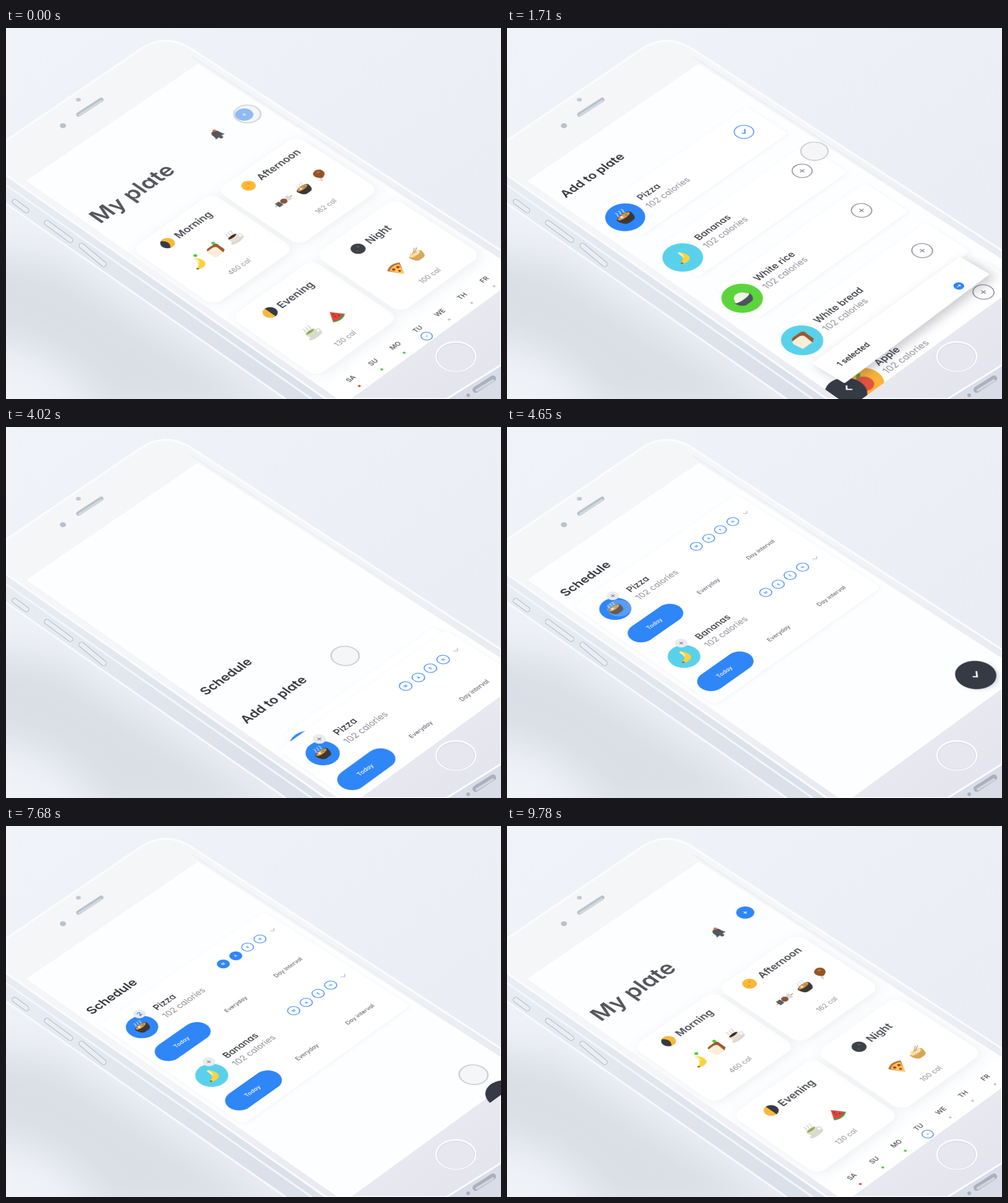
An HTML page that plays this animation: 800 by 600 pixels, repeating every 9810 ms.

```html
<!DOCTYPE html>
<html lang="en">
<head>
<meta charset="utf-8">
<title>Meal planner</title>
<style>
  html, body { margin: 0; width: 100%; height: 100%; overflow: hidden; background: #eef1f6; }
  #stage { position: relative; width: 800px; height: 600px; overflow: hidden; }
  svg { position: absolute; left: 0; top: 0; }
  .plane { transform-origin: 0 0; }
  #screen { overflow: hidden; }
  #overlay { overflow: visible; }
  text { font-family: Inter, "Open Sans", sans-serif; font-feature-settings: "cv11"; }
  .mid { text-anchor: middle; dominant-baseline: central; }
  .card { fill: #fff; filter: drop-shadow(1px 4px 10px rgba(40, 40, 70, .075)); }
  .flat { fill: #fff; filter: drop-shadow(0 2px 4px rgba(60, 70, 120, .06)); }
  .popup { fill: #fff; stroke: #fff; stroke-width: 5; stroke-linejoin: round;
           filter: drop-shadow(2px 8px 9px rgba(30, 30, 60, .25)); }
  .line { fill: none; stroke-linecap: round; stroke-linejoin: round; }
</style>
</head>
<body>
<div id="stage">
  <svg width="800" height="600">
    <defs>
      <linearGradient id="bg" x2="1" y2="1">
        <stop stop-color="#f0f3f8"/><stop offset=".5" stop-color="#eceff5"/><stop offset="1" stop-color="#e8ebf1"/>
      </linearGradient>
      <linearGradient id="face" x2="1" y2="1">
        <stop stop-color="#f5f6f8"/><stop offset=".45" stop-color="#f6f6f9"/><stop offset="1" stop-color="#e2e3ed"/>
      </linearGradient>
      <linearGradient id="side" x2=".6" y2="1">
        <stop stop-color="#e9edf3"/><stop offset="1" stop-color="#dbe1ea"/>
      </linearGradient>
      <filter id="blur" x="-50%" y="-50%" width="200%" height="200%"><feGaussianBlur stdDeviation="28"/></filter>
    </defs>
    <rect width="800" height="600" fill="url(#bg)"/>
    <g filter="url(#blur)">
      <path d="M-60 360L80 380L440 620H160Q110 520-60 490Z" fill="#d9dfe5"/>
      <path d="M-60 560L60 540L130 640H-60Z" fill="#f1f4f8" opacity=".7"/>
    </g>
    <path d="M0 236V284L452 600H524Z" fill="url(#side)"/>
    <path d="M0 284L452 600" stroke="#f7f9fc" stroke-width="3"/>
    <path d="M0 254L494 600" stroke="#f4f6fa" stroke-width="3"/>
    <path d="M712 600L800 545V600Z" fill="#d9dde8"/>
    <path d="M0 182L222 31Q262 8 303 36L800 360V545L712 600H517L0 238Z" fill="url(#face)" stroke="#fbfcfd" stroke-width="3"/>
    <path d="M300 46L800 370" stroke="#eceef4" stroke-width="2"/>
    <g class="line" stroke="#aeb7c6" stroke-width="9"><path d="M14 281L33 295M66 315L104 343M122 352L158 382"/></g>
    <g class="line" stroke="#eaeef4" stroke-width="7"><path d="M14 281L33 295M66 315L104 343M122 352L158 382"/></g>
    <path d="M117 140L154 116" stroke="#b9c3cb" stroke-width="7" stroke-linecap="round"/>
    <path d="M118 141L154 118" stroke="#d2dade" stroke-width="3" stroke-linecap="round"/>
    <ellipse cx="92" cy="158" rx="5" ry="4" fill="#b9c1cb"/>
    <ellipse cx="117" cy="116" rx="4" ry="3" fill="#c3cad2"/>
    <ellipse cx="727" cy="531" rx="32" ry="23.5" fill="#e6e7ef" stroke="#fff" stroke-width="2"/>
    <ellipse cx="727" cy="532" rx="30" ry="22" fill="none" stroke="#d9dbe5"/>
    <path d="M759 585L787 567" stroke="#aab0bd" stroke-width="10" stroke-linecap="round"/>
    <path d="M761 586L787 570" stroke="#d1d5de" stroke-width="4" stroke-linecap="round"/>
    <ellipse cx="747" cy="594" rx="3" ry="3" fill="#a9afbc"/>
  </svg>
  <svg id="screen" class="plane" width="375" height="677"></svg>
  <svg id="overlay" class="plane" width="375" height="667"></svg>
</div>
<script>
const LOOP = 9810, W = 375, H = 667, AWAY = 660;
const BLUE = '#2f86f7', DARK = '#343b45', INK = '#33353d', SOFT = '#8b8d99';
const OUT = 'cubic-bezier(.215,.61,.355,1)', IN = 'cubic-bezier(.55,.06,.68,.19)', BOTH = 'cubic-bezier(.45,0,.55,1)';

// Perspective that lays the flat 375x667 interface onto the phone.
const plane = (([x0, y0], [x1, y1], [x2, y2], [x3, y3]) => {
  const ax = x1 - x2, ay = y1 - y2, bx = x3 - x2, by = y3 - y2;
  const sx = x0 - x1 + x2 - x3, sy = y0 - y1 + y2 - y3, det = ax * by - bx * ay;
  const g = (sx * by - bx * sy) / det, h = (ax * sy - sx * ay) / det;
  return { a: (x1 - x0 + g * x1) / W, b: (x3 - x0 + h * x3) / H, c: x0,
           d: (y1 - y0 + g * y1) / W, e: (y3 - y0 + h * y3) / H, f: y0, g: g / W, h: h / H };
})([33, 247], [310, 58], [836, 397], [547, 607.6]);

// Stage point to interface point.
function at(x, y) {
  const { a, b, c, d, e, f, g, h } = plane;
  const m = a - g * x, n = b - h * x, p = d - g * y, q = e - h * y, det = m * q - n * p;
  return [((x - c) * q - n * (y - f)) / det, (m * (y - f) - (x - c) * p) / det];
}

const put = (x, y, body) => `<g transform="translate(${at(x, y)})">${body}</g>`;
const item = body => `<g class="item">${body}</g>`;
const sized = (k, body) => `<g transform="scale(${k})">${body}</g>`;
const shown = (on, off, body) => `<g data-show="${on},${off}">${body}</g>`;
const hidden = (on, off, body) => `<g data-hide="${on},${off}">${body}</g>`;
const path = (d, fill) => `<path d="${d}" fill="${fill}"/>`;
const line = (d, color, width = 1.5) => `<path class="line" d="${d}" stroke="${color}" stroke-width="${width}"/>`;
const disc = (r, fill, x = 0, y = 0) => `<circle cx="${x}" cy="${y}" r="${r}" fill="${fill}"/>`;
const oval = (x, y, rx, ry, fill) => `<ellipse cx="${x}" cy="${y}" rx="${rx}" ry="${ry}" fill="${fill}"/>`;
const ring = (r, color, width = 1.4, fill = 'none') => `<circle r="${r}" fill="${fill}" stroke="${color}" stroke-width="${width}"/>`;
const box = (cls, x, y, w, h, r) => `<rect class="${cls}" x="${x}" y="${y}" width="${w}" height="${h}" rx="${r}"/>`;
const text = (s, size, fill, weight = 400, cls = '') =>
  `<text class="${cls}" font-size="${size}" fill="${fill}" font-weight="${weight}">${s}</text>`;
const cross = (r, color, width) => line(`M${-r} 0H${r}M0 ${-r}V${r}`, color, width);
const tick = (k, color, width) => line(`M${-5 * k} 0L${-1.5 * k} ${4 * k}L${6 * k} ${-4 * k}`, color, width);
const steam = color => line('M-4-6q-2-2 0-4t0-4M1-6q-2-2 0-4t0-4M6-6q-2-2 0-4t0-4', color, 1.2);
const bowl = (color, filling) => path('M-12-2Q-11 10-4 11H4Q11 10 12-2Z', color) + oval(0, -2, 12, 4.5, color) + oval(0, -2.5, 10, 3.5, filling);
const cup = (color, drink) => oval(0, 8, 13, 4, '#dcd8cf') + line('M9 0q6 0 4 4t-6 2', color, 2) +
  path('M-10-3Q-9 8 0 8T10-3Z', color) + oval(0, -3, 10, 3.5, '#f2eee5') + oval(0, -3, 8, 2.5, drink);

const food = {
  banana: path('M1-11L4-12Q13 2 6 9Q-1 14-11 9L-11 6Q2 6 1-11Z', '#fbd23c') + path('M1-11L4-12Q6-4 1 2Z', '#fff1b8') + path('M-11 6L-8 7V10L-11 9Z', '#7b5a28'),
  bread: path('M-9-5Q-10-11-3-11H8Q14-10 12-4V8L7 11H-8Z', '#9b5a2c') + path('M-12-1Q-13-7-6-7H2Q8-6 7 0L6 11H-10Z', '#fbeed9'),
  coffee: steam('#c9c9c9') + cup('#e7e0d4', '#4d2a1c'),
  tea: steam('#c9c9c9') + cup('#d5dccb', '#8fae53'),
  ramen: steam('#d3dbe4') + bowl('#3a3836', '#e5953f') + disc(2, '#fff0cf', -3, -3) + disc(1.6, '#6d9c3a', 4, -2),
  noodles: bowl('#d8a55a', '#f8dd95') + line('M-8-4q4-8 8 0t8 0', '#fff0c2', 2) + line('M-2-5L9-12M1-5L12-10', '#b5793c', 1),
  rice: path('M-11 0Q-8-10 0-10T11 0Z', '#f4f3ea') + path('M-13 0H13Q12 10 5 12H-5Q-12 10-13 0Z', '#4c545c') + oval(0, 0, 12, 3, '#f4f3ea'),
  skewer: line('M-17 0H17', '#b98b56') + path('M-14-5H-6V5H-14Z', '#5b5d61') + disc(5.5, '#87553a') + path('M6-5H13V5H6Z', '#d8dadd'),
  drumstick: line('M-4 6L-7 11', '#dddad4', 4) + path('M-5 6Q-12-3-5-9Q4-14 9-6Q11 5-2 8Z', '#955325') + oval(2, -5, 3, 2, '#b97239'),
  melon: path('M-1-11L12 7Q0 15-13 7Z', '#4c9a45') + path('M-1-11L10 5Q0 11-11 5Z', '#e2453e') + disc(1, '#5a1d1c', -2, 1) + disc(1, '#5a1d1c', 3, 3) + disc(1, '#5a1d1c', -1, -4),
  pizza: path('M0 14L-13-7Q0-16 13-7Z', '#b97334') + path('M0 14L-10-5Q0-11 10-5Z', '#fbcf56') + disc(2.6, '#c5362c', -4, -3) + disc(2.6, '#c5362c', 4, -2) + disc(2.2, '#c5362c', 0, 5),
  apple: disc(12, '#e5533d', 0, 2) + path('M0-9Q2-16 9-14Q7-8 0-9Z', '#5b9b3a')
};
const moons = {
  Morning: disc(11, DARK) + path('M-4-10.2A11 11 0 1 1-4 10.2Q7 0-4-10.2Z', '#fbb836'),
  Afternoon: disc(11, '#fbb836') + disc(2, '#e9a02b', 3, -3) + disc(2, '#e9a02b', -4, 3),
  Evening: disc(11, DARK) + path('M0-11A11 11 0 0 0 0 11Z', '#fbb836'),
  Night: disc(11, '#3c4148') + disc(2, '#555b63', 3, -3) + disc(1.5, '#555b63', -4, 3)
};

const meal = (name, [cx, cy], [mx, my], [tx, ty], cal, [kx, ky], dishes, extra = '') => item(
  put(cx, cy, box('card', -86, -86, 172, 172, 17)) +
  put(mx, my, moons[name]) + put(tx, ty, text(name, 18, '#4b4d55', 600)) +
  put(kx, ky, text(cal + ' cal', 12, SOFT)) +
  dishes.map(([kind, x, y]) => put(x, y, food[kind])).join('') + extra);

const [, barTop] = at(512, 582);
const days = ['SA', 'SU', 'MO', 'TU', 'WE', 'TH', 'FR'];
const dayMarks = ['#d8432f', '#48c93a', '#48c93a', null, '#c3c6cd', '#c3c6cd', '#c3c6cd'];
const greenDot = disc(3, '#49c93a');
const home =
  item(put(152, 317, text('My plate', 39, '#54565c', 600)) +
    put(341, 172, path('M-10 7Q-7 5-7-1Q-7-9 0-9T7-1Q7 5 10 7Z', '#55575d') + disc(3, '#55575d', 0, 9) + disc(2.6, '#e8623c', 3, -9)) +
    put(385, 140, disc(14, BLUE) + cross(2.8, '#fff', 1.2))) +
  meal('Morning', [334, 357], [261, 348], [280, 341], 460, [364, 400], [['banana', 311, 380], ['bread', 338, 360], ['coffee', 368, 339]],
    put(306, 368, greenDot) + put(335, 348, greenDot)) +
  meal('Afternoon', [471, 262], [392, 255], [413, 247], 162, [505, 301], [['skewer', 449, 280], ['ramen', 481, 260], ['drumstick', 507, 237]]) +
  meal('Evening', [498, 468], [427, 460], [446, 454], 130, [536, 516], [['tea', 494, 493], ['melon', 533, 465]]) +
  meal('Night', [633, 367], [569, 357], [589, 350], 100, [673, 414], [['pizza', 632, 390], ['noodles', 663, 367]]) +
  item(`<rect y="${barTop}" width="375" height="${H - barTop}" fill="#fff"/>` + days.map((day, i) =>
    put(557 + 36 * i, 567 - 26.7 * i, text(day, 11, '#44464e', 500, 'mid')) +
    put(571 + 36.3 * i, 579 - 26.9 * i, dayMarks[i] ? disc(2, dayMarks[i]) : ring(8, '#4d8fd6') + disc(1.5, '#9bbfe8'))).join(''));

const foods = [
  ['Pizza', 'ramen', BLUE, [191, 306], [383, 168], 1300],
  ['Bananas', 'banana', '#5ad1ea', [284, 371], [477, 231], 2250],
  ['White rice', 'rice', '#5bd53d', [380, 437], [573, 295]],
  ['White bread', 'bread', '#5ad1ea', [477, 505], [671, 360]],
  ['Apple', 'apple', '#fbb33c', [575, 574], [770, 427]]
];
const plus = ring(15, '#80828c') + cross(4, '#80828c', 1.4);
const checked = ring(15, BLUE) + tick(.85, BLUE, 1.8);
const corners = [[502, 546], [738, 376], [782, 402], [551, 576]].map(p => at(...p));
const list =
  item(put(95, 275, text('Add to plate', 22, INK, 600))) +
  foods.map(([name, kind, color, [x, y], [px, py], tap]) => item(
    put(x, y, box('flat', -12, -42, 318, 88, 5) + disc(30.5, color) + sized(kind === 'banana' ? 1 : 1.2, food[kind])) +
    put(x + 26, y - 27, text(name, 16.5, INK, 500)) + put(x + 40, y - 14, text('102 calories', 15.5, SOFT)) +
    put(px, py, tap ? hidden(tap, 4200, plus) + shown(tap, 4200, checked) : plus))).join('') +
  item(put(548, 590, disc(30, DARK)) + put(551, 583, line('M2.5-5L-2.5 0L2.5 5', '#fff', 2.4))) +
  `<g id="popup"><path class="popup" d="M${corners.join('L')}Z"/>` +
  put(545, 552, hidden(2250, 4200, text('1 selected', 13, INK, 600)) + shown(2250, 4200, text('2 selected', 13, INK, 600))) +
  put(732, 408, `<g id="next">${disc(15, BLUE)}${line('M-6 0H6M2-4L6 0L2 4', '#fff', 2.2)}</g>`) + '</g>';

const slots = [['M', 306, 193], ['A', 326, 180], ['E', 345, 166], ['N', 365, 153]];
const slot = (letter, on) => ring(9, BLUE, 1.3, on ? BLUE : '#fff') + text(letter, 6, on ? '#fff' : BLUE, 600, 'mid');
const count = s => text(s, 11, BLUE, 700, 'mid');
function plan(name, kind, color, taps) {
  const label = (x, y, s, fill) => put(x, y, text(s, 10, fill, 500, 'mid'));
  const [first, second] = taps;
  return put(175, 294, disc(24.5, color) + food[kind]) +
    put(171, 273, disc(9.5, '#e9ebef') + (first
      ? hidden(first, 8150, cross(3, '#777a84', 1.2)) + shown(first, second, count(1)) + shown(second, 8150, count(2))
      : cross(3, '#777a84', 1.2))) +
    put(200, 268, text(name, 16, INK, 500)) + put(214, 280, text('102 calories', 15, SOFT)) +
    slots.map(([s, x, y], i) => put(x, y, slot(s) + (taps[i] ? shown(taps[i], 8150, slot(s, true)) : ''))).join('') +
    put(386, 139, line('M-4-2L0 2L4-2', '#b5b7bf', 1.3)) +
    put(240, 317, `<rect x="-51" y="-20.5" width="102" height="41" rx="20.5" fill="${BLUE}"/>`) +
    label(238, 318, 'Today', '#fff') + label(325, 257, 'Everyday', '#666872') + label(409, 198, 'Day interval', '#666872');
}
const rowGap = at(287, 372)[1] - at(175, 294)[1] - 1.5;
const schedule =
  item(put(95, 275, text('Schedule', 22, INK, 600))) +
  item(put(108, 290, box('flat', 0, 0, 354, 302, 8)) + plan('Pizza', 'ramen', BLUE, [4700, 5250])) +
  item(`<g transform="translate(0 ${rowGap})">${plan('Bananas', 'banana', '#5ad1ea', [])}</g>`) +
  item(put(757.5, 401, `<g style="filter:drop-shadow(1px 4px 3px rgba(40,50,70,.15))">${disc(29.5, DARK)}</g>` + tick(1, '#fff', 2.4)));

const screen = document.getElementById('screen'), overlay = document.getElementById('overlay');
screen.innerHTML = `<rect width="${W}" height="${H}" fill="#fdfeff"/>` +
  `<g id="home">${home}</g><g id="list">${list}</g><g id="schedule">${schedule}</g>`;
overlay.innerHTML = `<g id="touch"><g id="finger">${ring(20.5, 'rgba(200,201,206,.85)', 2.2, 'rgba(238,238,239,.5)')}</g></g>`;
const { a, b, c, d, e, f, g, h } = plane;
for (const el of [screen, overlay]) el.style.transform = `matrix3d(${[a, d, 0, g, b, e, 0, h, 0, 0, 1, 0, c, f, 0, 1]})`;

// Each step is [ms, properties, easing to the next step].
function animate(el, steps) {
  const all = [[0, steps[0][1]], ...steps, [LOOP, steps.at(-1)[1]]];
  el.animate(all.map(([ms, props, easing = 'linear']) => ({ offset: ms / LOOP, easing, ...props })),
    { duration: LOOP, iterations: Infinity });
}
const move = (x, y, scale = 1) => ({ transform: `translate(${x}px, ${y}px) scale(${scale})` });
const here = move(0, 0), away = move(0, AWAY);
const items = id => document.querySelectorAll(`#${id} .item`);

items('home').forEach((el, i) => animate(el, [
  [100, here, IN], [600, away], [8197 + 82 * i, away, OUT], [9197 + 82 * i, here]]));
const visit = (id, start, stagger, length, leave) => items(id).forEach((el, i) => animate(el, [
  [start + stagger * i, away, OUT], [start + stagger * i + length, here], [leave, here, IN], [leave + 450, away]]));
visit('list', 400, 60, 700, 3650);
visit('schedule', 3900, 50, 560, 7500);

animate(document.getElementById('popup'), [
  [1350, move(0, 260), OUT], [1700, move(0, -7), BOTH], [1950, here], [3650, here, IN], [4000, move(0, 260)]]);
animate(document.getElementById('next'), [
  [1600, move(-20, 14, 0)], [1710, move(-10, 14, .5), OUT], [1950, here]]);

for (const [key, inside] of [['show', 1], ['hide', 0]]) {
  for (const el of document.querySelectorAll(`[data-${key}]`)) {
    const [on, off] = el.dataset[key].split(',').map(Number);
    const yes = { opacity: inside }, no = { opacity: 1 - inside };
    animate(el, [[on, no], [on, yes], [off, yes], [off, no]]);
  }
}

const route = [
  [0, 390, 139], [350, 390, 139, BOTH], [1150, 383, 168], [1400, 383, 168, IN], [1710, 497, 199, OUT],
  [2150, 477, 231], [2450, 477, 231, BOTH], [3250, 733, 409], [3700, 733, 409, BOTH], [4500, 181, 293],
  [5500, 181, 293, 'ease-in'], [6360, 463, 300, 'ease-out'], [7000, 755, 402], [7600, 755, 402, BOTH],
  [8610, 808, 412], [9000, 870, 430]];
animate(document.getElementById('touch'), route.map(([ms, x, y, ease]) => [ms, move(...at(x, y)), ease]));
const rest = { ...here, opacity: 1 }, press = { ...move(0, 0, .84), opacity: .4 };
animate(document.getElementById('finger'), [1300, 2250, 3720, 4660, 5250, 7350].flatMap(ms =>
  [[ms - 90, rest, BOTH], [ms, press, BOTH], [ms + 150, rest]]));
animate(overlay, [[9100, { opacity: 1 }], [9100, { opacity: 0 }]]);
</script>
</body>
</html>
```
